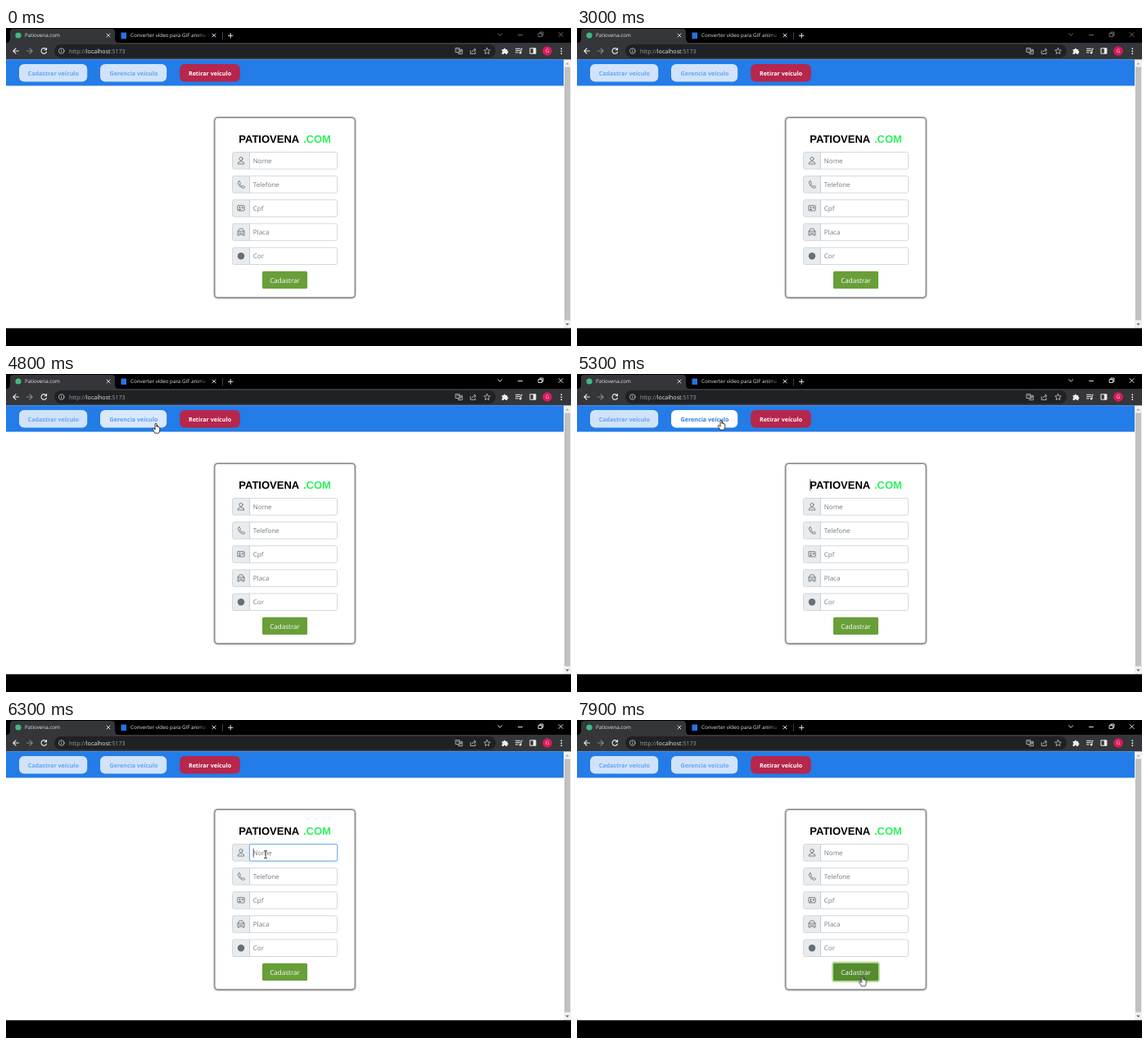
An HTML page that plays this animation: 690x388 px, repeating every 8 s.

```html
<!DOCTYPE html>
<html lang="pt">
<head>
<meta charset="utf-8">
<title>Patiovena.com</title>
<style>
html, body { margin: 0; width: 100%; height: 100%; overflow: hidden; background: #000; }
svg { display: block; width: 100vw; height: 100vh; }
text { font-family: "Open Sans", "Noto Sans", sans-serif; text-rendering: geometricPrecision; }
.line { fill: none; stroke-linecap: round; stroke-linejoin: round; }
.tab text { font-size: 6.25px; fill: #e3e4e6; }
.url { font-size: 7.1px; fill: #9aa0a6; }
.nav text { font-size: 7.15px; font-weight: 700; text-anchor: middle; fill: #69a4ee; }
.nav rect { fill: #d0e3fa; }
.nav .red { fill: #b7264b; }
.nav .on-red { fill: #fff; }
.brand { font: 700 13px "Liberation Sans", Arial, sans-serif; }
.hint { font-size: 8px; fill: #737b83; }
.ico { stroke: #5f676f; stroke-width: .8; }

/* timed parts: 1% = 80 ms */
.win, .cur, .arrow, .hand, .beam, .head-caret, .caret, .ring, .glow, .press, .halo {
  animation: 8s step-end -.02s infinite;
}
.win { animation-name: win; }
.cur { animation-name: move; }
.arrow { animation-name: arrow; }
.hand { animation-name: hand; }
.beam { animation-name: beam; }
.head-caret { animation-name: headCaret; }
.caret { animation-name: caret; }
.ring { animation-name: ring; }
.glow { animation-name: glow; }
.press { animation-name: press; }
.halo { animation-name: halo; }
.nav .hover { animation: hover 8s ease -.02s infinite; }
.nav .hover-text { animation: hoverText 8s ease -.02s infinite; }

@keyframes win { 0% { stroke: #77787a; } 47.5%, 100% { stroke: #f4f4f4; } }
@keyframes move {
  0% { transform: translate(420px, 346px); }
  48.75% { transform: translate(360px, 295px); }
  52.5% { transform: translate(270px, 178px); }
  53.75% { transform: translate(202px, 90px); }
  60% { transform: translate(183px, 60px); }
  61.25% { transform: translate(176px, 56px); }
  67.5% { transform: translate(192px, 62px); }
  68.75% { transform: translate(204px, 66px); }
  70% { transform: translate(220.5px, 69px); }
  71.25% { transform: translate(380px, 62px); }
  72.5% { transform: translate(560px, 53px); }
  73.75% { transform: translate(617px, 48px); }
  75% { transform: translate(460px, 112px); }
  76.25% { transform: translate(317px, 164px); }
  90%, 100% { transform: translate(348.5px, 312.5px); }
}
@keyframes arrow {
  0% { opacity: 0; } 47.5% { opacity: 1; } 60% { opacity: 0; }
  68.75% { opacity: 1; } 76.25%, 100% { opacity: 0; }
}
@keyframes hand { 0% { opacity: 0; } 60% { opacity: 1; } 68.75% { opacity: 0; } 90%, 100% { opacity: 1; } }
@keyframes beam { 0% { opacity: 0; } 76.25% { opacity: 1; } 90%, 100% { opacity: 0; } }
@keyframes headCaret {
  0% { opacity: 0; } 63.75% { opacity: 1; } 70% { opacity: 0; }
  76.25% { opacity: 1; } 78.75%, 100% { opacity: 0; }
}
@keyframes caret { 0% { opacity: 0; } 78.75% { opacity: 1; } 90%, 100% { opacity: 0; } }
@keyframes ring { 0% { opacity: 0; } 76.25% { opacity: 1; } 93.75%, 100% { opacity: 0; } }
@keyframes glow { 0% { opacity: 0; } 76.25% { opacity: .25; } 81.25% { opacity: 1; } 93.75%, 100% { opacity: 0; } }
@keyframes press { 0% { fill: #689f38; } 90% { fill: #578c2e; } 93.75%, 100% { fill: #558b2f; } }
@keyframes halo { 0% { opacity: 0; } 93.75% { opacity: .6; } 95%, 100% { opacity: 1; } }
@keyframes hover {
  0%, 59.4% { fill: #d0e3fa; } 65%, 67.8% { fill: #fff; } 74%, 100% { fill: #d0e3fa; }
}
@keyframes hoverText {
  0%, 59.4% { fill: #69a4ee; } 65%, 67.8% { fill: #2a7de3; } 74%, 100% { fill: #69a4ee; }
}
</style>
</head>
<body>
<svg viewBox="0 0 690 388" preserveAspectRatio="none">
  <defs>
    <linearGradient id="fade"><stop stop-color="#000" stop-opacity="0"/><stop offset="1"/></linearGradient>
    <filter id="soft" x="-10%" y="-10%" width="120%" height="120%"><feGaussianBlur stdDeviation="1.3"/></filter>
    <g id="field">
      <rect x="276.5" y=".5" width="128" height="20.6" rx="2" fill="#fff"/>
      <path d="M297.5 .5H278.5a2 2 0 0 0-2 2V19.1a2 2 0 0 0 2 2H297.5z" fill="#e9ecef"/>
      <path d="M297.5 .5V21" stroke="#c9cfd6"/>
      <rect x="276.5" y=".5" width="128" height="20.6" rx="2" fill="none" stroke="#ced4da" stroke-width=".9"/>
    </g>
    <path id="cross" class="line" d="M-2-2L2 2M2-2L-2 2"/>
  </defs>

  <!-- browser tabs -->
  <rect width="690" height="388" fill="#000"/>
  <path d="M0 18.5Q5 18 5 13V5Q5 1 9 1H129Q133 1 133 5V13Q133 18 138 18.5z" fill="#35363a"/>
  <g class="tab">
    <circle cx="15" cy="9" r="3.6" fill="#41b883"/>
    <text x="23" y="11.4">Patiovena.com</text>
    <rect x="140.5" y="5.5" width="6.5" height="7.5" fill="#2474e0"/>
    <text x="152" y="11.4">Converter vídeo para GIF anima</text>
    <rect x="234" y="3" width="13" height="12" fill="url(#fade)"/>
  </g>
  <g stroke="#e8e8e8" stroke-width=".9">
    <use href="#cross" x="125" y="9"/>
    <use href="#cross" x="254" y="9"/>
    <path d="M271 9.3h6.4M274.2 6.1v6.4" stroke-width="1"/>
    <path d="M264.5 5v9" stroke="#4a4b4e"/>
  </g>
  <g class="win line" stroke-width=".9">
    <path d="M600.7 6.8l2.5 2.4 2.5-2.4M625.5 8.5h5M650.5 6.5h4v4h-4zM652 6.3V5h4v4h-1.3"/>
    <path d="M675 5.5l5 5M680 5.5l-5 5"/>
  </g>

  <!-- toolbar -->
  <rect y="18" width="690" height="20.5" fill="#35363a"/>
  <rect x="59" y="20" width="539" height="16.2" rx="8.1" fill="#202124"/>
  <g class="line" stroke="#e8eaed" stroke-width="1.1">
    <path d="M15.5 28H9M12 24.8L8.8 28 12 31.2"/>
    <path d="M25.5 28H32M29 24.8L32.2 28 29 31.2" stroke="#85878b"/>
    <path d="M49 26A3.3 3.3 0 1 0 49.4 29.2M49.5 24.5V26.8H47.2"/>
  </g>
  <g class="line" stroke="#c4c7ca" stroke-width=".8">
    <circle cx="67.8" cy="28" r="3.3"/><path d="M67.8 27.6v2M67.8 26.1v.1"/>
    <path d="M549.3 24.5h4.4v5h-4.4zM553.8 26.3h3.4v5.4h-4.6l-.7-2M554.5 28h2.2M555.6 28q-.4 2-1.6 2.6M550.5 26.3h1.8"/>
    <path d="M567.2 27.5v4h6V29.6M569 29.2q.4-2.6 4-2.8M571.7 24.8l2.2 2-2.2 2"/>
    <path d="M587.5 24.3l1.1 2.5 2.7.3-2 1.8.6 2.7-2.4-1.4-2.4 1.4.6-2.7-2-1.8 2.7-.3z"/>
  </g>
  <text class="url" x="77" y="30.6">http://<tspan fill="#e8eaed">localhost</tspan>:5173</text>
  <path d="M605.6 26h2.1a1.2 1.2 0 1 1 2.4 0h2.1v2.1a1.2 1.2 0 1 1 0 2.4V32h-2.1a1.2 1.2 0 0 0-2.4 0h-2.1v-2.2a1.2 1.2 0 0 0 0-2.2z" fill="#eee"/>
  <g class="line" stroke="#eee">
    <path d="M622.5 25.3h5M622.5 27.6h5M622.5 29.9h2.6M629 30V25.3h1.3"/>
    <rect x="640.3" y="24.8" width="6.6" height="6.4"/>
  </g>
  <circle cx="628" cy="30.2" r="1.2" fill="#eee"/>
  <rect x="643.8" y="24.8" width="3.1" height="6.4" fill="#eee"/>
  <circle cx="661" cy="28" r="5.8" fill="#d81b60"/>
  <text x="661" y="30.3" font-size="6.2" text-anchor="middle" fill="#f8d5e2">G</text>
  <g fill="#eee"><circle cx="678.3" cy="25.2" r=".9"/><circle cx="678.3" cy="28.2" r=".9"/><circle cx="678.3" cy="31.2" r=".9"/></g>

  <!-- page -->
  <rect y="38.3" width="681" height="328" fill="#fff"/>
  <rect y="38.3" width="681" height="32.2" fill="#237ce8"/>
  <rect x="681" y="38.3" width="9" height="328" fill="#f1f1f1"/>
  <rect x="682" y="47.5" width="7" height="309" fill="#c1c1c1"/>
  <path d="M683.4 44.6l2.1-2.4 2.1 2.4z" fill="#a3a3a3"/>
  <path d="M683.4 360.4l2.1 2.4 2.1-2.4z" fill="#505050"/>
  <g class="nav">
    <rect x="16" y="44" width="83.2" height="21.4" rx="6"/>
    <text x="57.8" y="57.5">Cadastrar veículo</text>
    <rect class="hover" x="115" y="44" width="81.2" height="21.4" rx="6"/>
    <text class="hover-text" x="156" y="57.5">Gerencia veículo</text>
    <rect class="red" x="212.2" y="44" width="73.6" height="21.4" rx="6"/>
    <text class="on-red" x="249" y="57.5">Retirar veículo</text>
  </g>

  <!-- form card -->
  <rect x="254.5" y="109" width="172" height="220.5" rx="4" fill="#555" filter="url(#soft)"/>
  <rect x="255" y="109.4" width="171" height="219.4" rx="3.5" fill="#fff" stroke="#666" stroke-width=".8"/>
  <text class="brand" x="284.3" y="140.2">PATIOVENA</text>
  <text class="brand" x="363" y="140.2" fill="#2cf25c">.COM</text>
  <path class="head-caret" d="M284.8 128.3V142.5" stroke="#333" stroke-width=".8"/>

  <g transform="translate(0 151)">
    <use href="#field"/>
    <g class="line ico"><circle cx="287" cy="8.6" r="2.1"/><path d="M283 14.6q0-2.8 4-2.8t4 2.8z"/></g>
    <rect class="glow" x="296.4" y="-.6" width="109.2" height="22.8" rx="3" fill="none" stroke="#b9d6fb" stroke-width="2"/>
    <rect class="ring" x="297.5" y=".5" width="107" height="20.6" rx="2" fill="none" stroke="#6cabea" stroke-width=".9"/>
    <text class="hint" x="301.8" y="14">Nome</text>
    <path class="caret" d="M302.2 5.6V16.8" stroke="#222" stroke-width=".7"/>
  </g>
  <g transform="translate(0 180.1)">
    <use href="#field"/>
    <path class="line ico" d="M284.8 6.7l1.6 2.1-.7 1.5q.6 1.9 2.6 2.7l1.5-.7 1.9 1.5q-.8 1.8-2.4 1.4-4.8-1.3-6-6.2-.2-1.8 1.5-2.3z"/>
    <text class="hint" x="301.8" y="14">Telefone</text>
  </g>
  <g transform="translate(0 209.2)">
    <use href="#field"/>
    <g class="line ico"><rect x="282.8" y="7.4" width="8.4" height="6.4" rx="1"/><path d="M288.2 9.4h1.7M288.2 10.8h1.7"/></g>
    <path d="M284 12.9q0-1.7 1.5-1.7t1.5 1.7zM284.6 9.7a.9.9 0 1 1 1.8 0a.9.9 0 1 1-1.8 0" fill="#5f676f"/>
    <text class="hint" x="301.8" y="14">Cpf</text>
  </g>
  <g transform="translate(0 238.3)">
    <use href="#field"/>
    <path class="line ico" d="M283.6 9.7l1-2.6q.2-.5.8-.5h3.2q.6 0 .8.5l1 2.6M282.8 9.7h8.4M283.5 9.7q-.5.3-.5 1v4h1.7v-1.1h4.6v1.1h1.7v-4q0-.7-.5-1M284.6 11.7h.5M288.9 11.7h.5M286.2 11.9h1.6"/>
    <text class="hint" x="301.8" y="14">Placa</text>
  </g>
  <g transform="translate(0 267.4)">
    <use href="#field"/>
    <circle cx="287" cy="10.8" r="4.2" fill="#666e76"/>
    <text class="hint" x="301.8" y="14">Cor</text>
  </g>

  <rect class="halo" x="312" y="295.7" width="57" height="23.4" rx="2.5" fill="none" stroke="#b9dc98" stroke-width="2"/>
  <rect class="press" x="313" y="296.8" width="55" height="21.2" rx="1.5"/>
  <text x="340.5" y="310.5" font-size="8.1" text-anchor="middle" fill="#fff">Cadastrar</text>

  <!-- pointer -->
  <g class="cur" stroke="#111" stroke-width=".8" stroke-linejoin="round">
    <path class="arrow" fill="#fff" d="M0 0V8.5L2 6.8 3.4 10 4.8 9.4 3.5 6.3H6z"/>
    <path class="hand" fill="#fff" d="M-1 .9Q0-.6 1 .9V4.3Q2-.0 2.2 4.6 3.3 3.7 3.6 5 4.7 4.4 4.8 5.8V8.3Q4.6 10.3 3.6 12.2H-1.3Q-1.9 10.6-3.9 7.5-3.9 6.2-2.6 6.6L-1 8z"/>
    <path class="beam" fill="none" d="M-2-4.5H-.5L0-4.1 .5-4.5H2M0-4.1V4.1M-2 4.5H-.5L0 4.1 .5 4.5H2"/>
  </g>
</svg>
</body>
</html>
```
